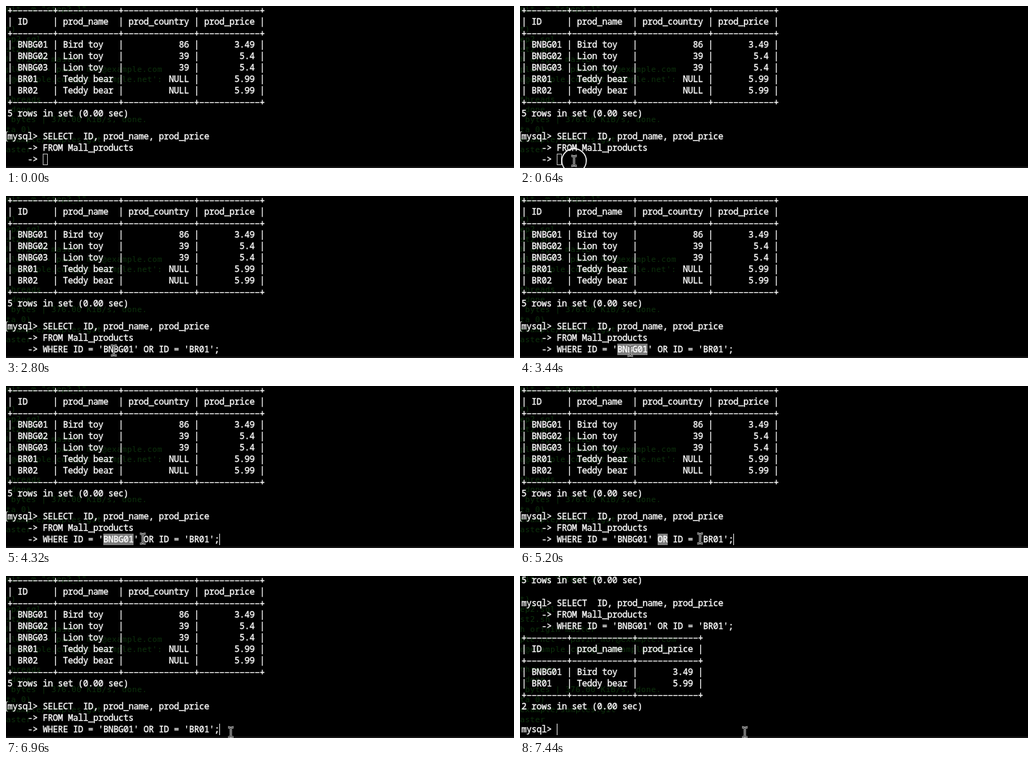
Write an HTML page that moves like this. It is 705x226 px and loops after 8 s.

```html
<!DOCTYPE html>
<html lang="en">
<head>
<meta charset="utf-8">
<title>SQL terminal</title>
<style>
  html, body { margin: 0; width: 100%; height: 100%; overflow: hidden; background: #000; }
  svg { display: block; width: 705px; height: 226px; }
  text {
    font: 12px "Noto Sans Mono", "DejaVu Sans Mono", monospace;
    white-space: pre; fill: #fff; stroke: #fff; stroke-width: .35px;
  }
  #ghost text { font: 11px "DejaVu Sans Mono", monospace; fill: #0c300c; stroke: none; }
</style>
</head>
<body>
<svg viewBox="0 0 705 226">
  <rect width="705" height="226" fill="#000"/>
  <rect y="224" width="705" height="2" fill="#161616"/>
  <g id="ghost"></g>
  <rect id="sel" y="206" height="16" fill="#7c7c7c"/>
  <g id="query">
    <path d="M2.5 175.5H.5V188.5H2.5" fill="none" stroke="#ccc"/>
  </g>
  <g id="result"></g>
  <rect id="box" x="51.5" y="206.5" width="6" height="15" fill="none" stroke="#b4b4b4"/>
  <rect id="bar" y="206" width="1" height="16" fill="#ddd"/>
  <g id="mouse" fill="none">
    <circle id="ring" r="17" stroke="#fff" stroke-width="1.5"/>
    <path class="beam" stroke="#b0b0b0" stroke-width="3"/>
    <path class="beam" stroke="#3c3c3c" stroke-width="1"/>
  </g>
</svg>
<script>
const LOOP = 8000, STEP = 80, CELL = 7, ROW = 16, LEFT = 2;
const $ = id => document.getElementById(id);
const col = n => LEFT + n * CELL;

// Every character sits in its own terminal cell.
function addText(parent, str, left, y) {
  const el = document.createElementNS("http://www.w3.org/2000/svg", "text");
  el.setAttribute("x", [...str].map((_, i) => left + i * CELL).join(" "));
  el.setAttribute("y", y);
  el.textContent = str;
  parent.appendChild(el);
  return el;
}

// Table rules sit one pixel lower than text.
const addRow = (parent, str, row) =>
  addText(parent, str, LEFT, 10 + row * ROW + (str[0] === "+" ? 1 : 0));

// Column widths follow the heads; numeric columns are right aligned.
function table(heads, rows) {
  const widths = heads.map(h => h === "ID" ? "BNBG01".length : h.length);
  const rule = "+" + widths.map(w => "\u2212".repeat(w + 2) + "+").join("");
  const line = cells => "|" + cells.map((c, i) =>
    " " + (/^(\d|NULL)/.test(c) ? c.padStart(widths[i]) : c.padEnd(widths[i])) + " |").join("");
  return [rule, line(heads), rule, ...rows.map(line), rule];
}

const select = "mysql> SELECT  ID, prod_name, prod_price";
const from = "    -> FROM Mall_products";
const where = "WHERE ID = 'BNBG01' OR ID = 'BR01';";
const fiveRows = "5 rows in set (0.00 sec)";

const before = [
  ...table(["ID", "prod_name ", "prod_country", "prod_price"], [
    ["BNBG01", "Bird toy", "86", "3.49"],
    ["BNBG02", "Lion toy", "39", "5.4"],
    ["BNBG03", "Lion toy", "39", "5.4"],
    ["BR01", "Teddy bear", "NULL", "5.99"],
    ["BR02", "Teddy bear", "NULL", "5.99"]
  ]),
  fiveRows, "", select, from, "    -> "
];
const after = [
  fiveRows, "", select, from, "    -> " + where,
  ...table(["ID", "prod_name ", "prod_price"], [
    ["BNBG01", "Bird toy", "3.49"],
    ["BR01", "Teddy bear", "5.99"]
  ]),
  "2 rows in set (0.00 sec)", "", "mysql> "
];
before.forEach((s, i) => addRow($("query"), s, i));
after.forEach((s, i) => addRow($("result"), s, i));
const pasted = addText($("query"), where, col(7), 10 + 13 * ROW);

// Dim window showing through the translucent terminal.
['mit -m "step2_1"', "", "t)", "ep2.sql", "st2.sh", "h origin master",
 "ple.net - pavin_mor@example.com", "d@example.com@git.example.net':", "",
 "threads", " done.", " bytes | 376.00 KiB/s, done.", "ta 0)", "example/samples.git", "aster"
].forEach((s, i) => addText($("ghost"), s, 0, 8 + i * 14));

document.querySelectorAll(".beam").forEach(p => p.setAttribute("d",
  "M-4-7Q0-7 0-5Q0-7 4-7M0-5V5M-4 7Q0 7 0 5Q0 7 4 7"));

const FOCUS = 720, PASTE = 1840, RESULT = 7440;

// Each gesture: travel to a spot, click there, select a word.
const gestures = [
  { go: 160, stop: 560, click: 560, x: 75, y: 216, word: "" },
  { go: 2240, stop: 2880, click: 3280, x: 153, y: 216, word: "BNBG01" },
  { go: 4000, stop: 4440, click: 4640, x: 198, y: 215, word: "OR" },
  { go: 4880, stop: 5360, click: 5600, x: 268, y: 216, word: "BR01" },
  { go: 5920, stop: 6320, click: 6320, x: 312, y: 218, word: "" }
];
const ENTRY = { x: 183, y: 240 }, LIFT = 4, PRESS = 160;

const ease = u => u * u * (3 - 2 * u);
const show = (el, on) => el.setAttribute("visibility", on ? "visible" : "hidden");

function mouseAt(t) {
  const i = gestures.findLastIndex(g => t >= g.go);
  if (i < 0) return ENTRY;
  const a = gestures[i - 1] || ENTRY, b = gestures[i];
  const u = ease(Math.min(1, (t - b.go) / (b.stop - b.go)));
  return {
    x: a.x + (b.x - a.x) * u,
    y: a.y + (b.y - a.y) * u - LIFT * Math.sin(Math.PI * u)
  };
}

function barOn(t) {
  if (t < FOCUS) return false;
  if (t >= RESULT) return true;
  const beat = t < PASTE ? (t - FOCUS) / 480 : (t - PASTE + 32) / 512;
  return Math.floor(beat) % 2 === 0;
}

function draw(ms) {
  const t = Math.floor((ms % LOOP) / STEP) * STEP;
  const done = t >= RESULT, typed = t >= PASTE && !done;
  show($("query"), !done);
  show($("result"), done);
  show(pasted, typed);

  show($("box"), t < FOCUS);
  show($("bar"), barOn(t));
  $("bar").setAttribute("x", col(7 + (typed ? where.length : 0)));

  const picked = gestures.findLast(g => t >= g.click + STEP);
  const word = picked ? picked.word : "";
  $("sel").setAttribute("x", col(7 + where.indexOf(word)));
  $("sel").setAttribute("width", word.length * CELL);

  const { x, y } = mouseAt(t);
  show($("mouse"), t >= 240);
  show($("ring"), gestures.some(g => t >= g.click && t < g.click + PRESS));
  $("mouse").setAttribute("transform", `translate(${x.toFixed(1)} ${y.toFixed(1)})`);
}

const start = performance.now();
function tick() {
  draw(performance.now() - start);
  requestAnimationFrame(tick);
}
tick();
</script>
</body>
</html>
```
